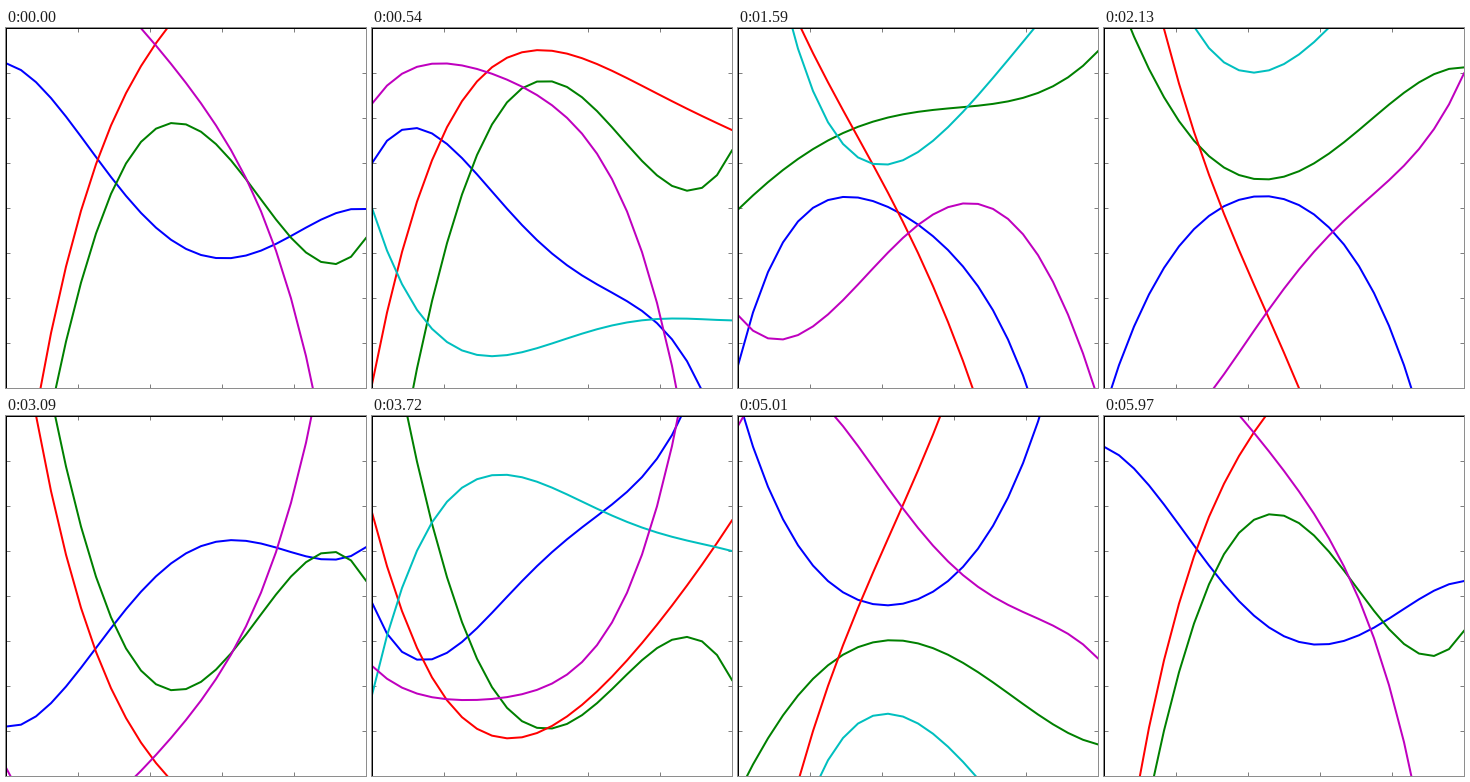
Animation, 360 px wide and 360 px high, one loop 6000 ms. Source, as a matplotlib script:

```python
import numpy as np
import matplotlib.pyplot as plt
from matplotlib.animation import FuncAnimation

FRAMES, INTERVAL = 200, 30
PX_PER_UNIT = 45
KEYS = np.linspace(0, 5, 5)

# Two quartics per curve, each set by its height in pixels at the five keys.
# The curve swings through them on a circle: cos(t) * first + sin(t) * second.
CURVES = {
    "b": ([144.8, 51, -40.9, -35.9, -1], [-144.5, 12.8, -20.5, -135.5, -508]),
    "g": ([-465.3, -25.5, 83.6, -11.5, -30], [-45.6, 65.4, 104.5, 106, 154.7]),
    "r": ([-405.5, 43.8, 202.7, 312, 501], [309.8, 130.4, -26, -263.5, -644]),
    "c": ([-283, -210.7, -185, -214.5, -282], [446, 66.2, 38.7, 128.4, 234.6]),
    "m": ([181, 223.3, 125, -42.7, -531], [-90.6, -85.8, -5.2, -15, -241.5]),
}


def quartic(heights, x):
    return np.polyval(np.polyfit(KEYS, heights, 4), x) / PX_PER_UNIT


fig = plt.figure(figsize=(5, 5), dpi=72, facecolor="white")
ax = fig.add_axes([0, 0, 1, 1])
ax.set(xlim=(0, 5), ylim=(-4, 4), xticks=range(6), yticks=range(-4, 5))
ax.tick_params(direction="in", length=4, width=0.5, top=True, right=True,
               labelbottom=False, labelleft=False)
for spine in ax.spines.values():
    spine.set_linewidth(1)

x = np.linspace(0, 5, 25)
parts = []
for color, (first, second) in CURVES.items():
    line, = ax.plot(x, np.zeros_like(x), color=color, lw=2)
    parts.append((line, quartic(first, x), quartic(second, x)))


def update(i):
    t = 2 * np.pi * i / FRAMES
    for line, first, second in parts:
        line.set_ydata(np.cos(t) * first + np.sin(t) * second)
    return [line for line, _, _ in parts]


anim = FuncAnimation(fig, update, frames=FRAMES, interval=INTERVAL,
                     repeat=True, repeat_delay=0)
plt.show()
```
